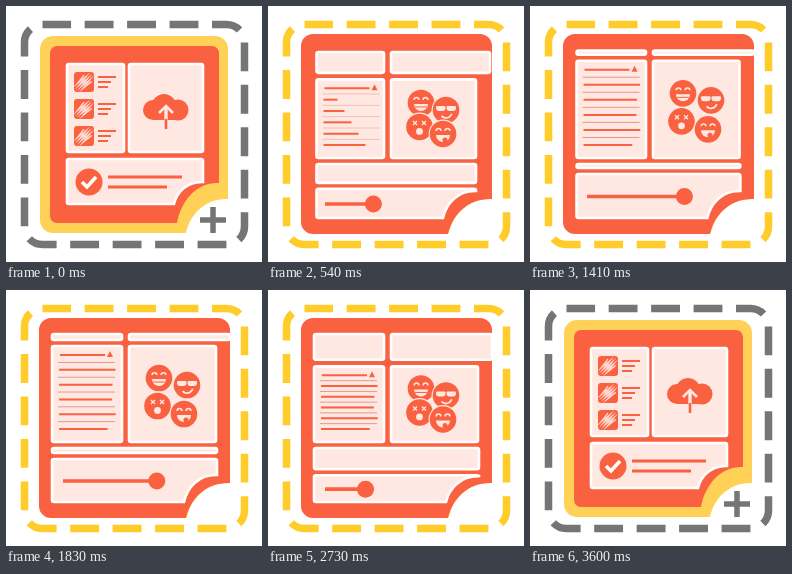
Recreate the animation shown at these times as an HTML page with a canvas. Size 256 px wide and 256 px high, loop 4.74 s.

```html
<!DOCTYPE html>
<html lang="en">
<head>
<meta charset="utf-8">
<title>Layout widget</title>
<style>
html, body { margin: 0; width: 100%; height: 100%; overflow: hidden; background: #fff; }
canvas { display: block; width: 100vw; height: 100vh; }
</style>
</head>
<body>
<canvas id="stage"></canvas>
<script>
const LOOP = 4740;
const ORANGE = '#fa6140', YELLOW = '#ffd257', PALE = '#ffe7e2', GRAY = '#757575';
const canvas = document.getElementById('stage');
const ctx = canvas.getContext('2d');

const clamp = v => Math.max(0, Math.min(1, v));
const lerp = (a, b, k) => a + (b - a) * k;
const ease = v => v * v * (3 - 2 * v);
const ramp = (t, a, b) => ease(clamp((t - a) / (b - a)));
// 0 outside the visit, 1 inside it
const pulse = (t, a, b, c, d) => ramp(t, a, b) * (1 - ramp(t, c, d));

function mix(a, b, k) {
  return `rgb(${a.map((v, i) => Math.round(lerp(v, b[i], k))).join()})`;
}

function box(x0, y0, x1, y1, r, fill, stroke, width) {
  ctx.beginPath();
  ctx.roundRect(x0, y0, x1 - x0, y1 - y0, r);
  if (fill) { ctx.fillStyle = fill; ctx.fill(); }
  if (stroke) { ctx.strokeStyle = stroke; ctx.lineWidth = width; ctx.stroke(); }
}

function line(x0, y0, x1, y1, width, color = ORANGE) {
  ctx.beginPath();
  ctx.moveTo(x0, y0);
  ctx.lineTo(x1, y1);
  ctx.strokeStyle = color;
  ctx.lineWidth = width;
  ctx.stroke();
}

function disc(x, y, r, color) {
  ctx.beginPath();
  ctx.arc(x, y, r, 0, 7);
  ctx.fillStyle = color;
  ctx.fill();
}

function poly(points, color, width) {
  ctx.beginPath();
  points.forEach(([x, y]) => ctx.lineTo(x, y));
  ctx.strokeStyle = color;
  ctx.lineWidth = width;
  ctx.stroke();
}

// Rounded sheet whose bottom right corner is scooped out
function sheet(x0, y0, x1, y1, r, bw, bh, fill, stroke, width) {
  ctx.beginPath();
  ctx.moveTo(x0 + r, y0);
  ctx.arcTo(x1, y0, x1, y1, r);
  ctx.lineTo(x1, y1 - bh);
  ctx.bezierCurveTo(x1 - bw * .55, y1 - bh * 1.02, x1 - bw * .9, y1 - bh * .55, x1 - bw, y1);
  ctx.arcTo(x0, y1, x0, y0, r);
  ctx.arcTo(x0, y0, x1, y0, r);
  ctx.closePath();
  ctx.fillStyle = fill;
  ctx.fill();
  if (stroke) { ctx.strokeStyle = stroke; ctx.lineWidth = width; ctx.stroke(); }
}

function panel(x0, y0, x1, y1) {
  box(x0 + 1, y0 + 1, x1 - 1, y1 - 1, 2, PALE, '#fff', 2.6);
}

function dashes(color) {
  const a = 18.5, b = 238.5, r = 18, step = ((b - a - 2 * r) * 4 + 2 * Math.PI * r) / 20;
  ctx.save();
  ctx.setLineDash([step * .68, step * .32]);
  ctx.lineDashOffset = step * .34 - Math.PI * r / 4;
  ctx.beginPath();
  ctx.moveTo(a + r, a);
  ctx.arcTo(b, a, b, b, r);
  ctx.arcTo(b, b, a, b, r);
  ctx.arcTo(a, b, a, a, r);
  ctx.arcTo(a, a, b, a, r);
  ctx.closePath();
  ctx.strokeStyle = color;
  ctx.lineWidth = 7.5;
  ctx.stroke();
  ctx.restore();
}

function thumb(x, y) {
  box(x - 10, y - 10, x + 10, y + 10, 3, ORANGE);
  const zig = [];
  for (let i = 0; i < 9; i++) {
    const d = i * 1.4 - 5.5, s = i % 2 ? 1 : -1;
    zig.push([x + d * .7 - s * 3.8, y + d * .55 + s * 3.8]);
  }
  poly(zig, '#ffd9d0', 1.4);
}

function cloud(x, y) {
  disc(x - 13, y + 3, 10, ORANGE);
  disc(x - 2, y - 1, 12, ORANGE);
  disc(x + 12, y + 3, 10.5, ORANGE);
  ctx.fillRect(x - 13, y + 3, 26, 10);
  line(x, y + 23, x, y + 2, 3.6, PALE);
  line(x, y + 22, x, y + 1, 2.6);
  poly([[x - 7, y + 6], [x, y - 1], [x + 7, y + 6]], PALE, 2.6);
  line(x, y + 12, x, y, 2.6, PALE);
}

function fileCard(k) {
  panel(60, 57, 119, 147);
  panel(122, 57, 198, 147);
  for (let i = 0; i < 3; i++) {
    const y = lerp(76, 74, k) + i * lerp(27, 25.6, k);
    thumb(78, y);
    line(92, y - 5, 110, y - 5, 2);
    line(92, y, 105, y, 2);
    line(92, y + 5, 102, y + 5, 2);
  }
  cloud(160, 101);
  sheet(61, 153, 197, 198, 2, 29, 22, PALE, '#fff', 2.6);
  disc(83, 176, 13.5, ORANGE);
  poly([[76, 176], [81, 181], [90, 171]], '#fff', 3.6);
  line(102, 171, 176, 171, 3);
  line(102, 181, 161, 181, 3);
}

function smile(x, y) {
  ctx.beginPath();
  ctx.arc(x, y, 7, 0, Math.PI);
  ctx.closePath();
  ctx.fillStyle = PALE;
  ctx.fill();
}

function brow(x, y) {
  ctx.beginPath();
  ctx.arc(x, y, 2.4, Math.PI, 0);
  ctx.strokeStyle = PALE;
  ctx.lineWidth = 1.5;
  ctx.stroke();
}

function cross(x, y) {
  line(x - 2, y - 2, x + 2, y + 2, 1.3, PALE);
  line(x + 2, y - 2, x - 2, y + 2, 1.3, PALE);
}

function faces(y, k) {
  const at = [[153, y], [lerp(178, 181, k), y + 7], [151.5, lerp(y + 24, y + 28, k)], [lerp(175, 178, k), lerp(y + 31, y + 36, k)]];
  at.forEach(([fx, fy], i) => {
    disc(fx, fy, 14.4, PALE);
    disc(fx, fy, 13.3, ORANGE);
    if (i === 0 || i === 3) {
      brow(fx - 4.5, fy - 3);
      brow(fx + 4.5, fy - 3);
      smile(fx, fy + 1);
      if (i === 0) line(fx - 6, fy + 4, fx + 6, fy + 4, 1, ORANGE);
      else disc(fx + 2, fy + 6, 2.5, ORANGE);
    } else if (i === 1) {
      box(fx - 10, fy - 4, fx - .5, fy + 1, [1, 1, 3, 3], PALE);
      box(fx + .5, fy - 4, fx + 10, fy + 1, [1, 1, 3, 3], PALE);
      ctx.beginPath();
      ctx.arc(fx, fy + 2, 6, .3, 2.4);
      ctx.strokeStyle = PALE;
      ctx.lineWidth = 1.8;
      ctx.stroke();
    } else {
      cross(fx - 4.5, fy - 4);
      cross(fx + 4.5, fy - 4);
      disc(fx, fy + 4.5, 3.4, PALE);
    }
  });
}

function list(x, top, full) {
  const head = top + 10;
  line(x + 9, head, x + 54, head, 2);
  ctx.beginPath();
  ctx.moveTo(x + 56, head + 2);
  ctx.lineTo(x + 59, head - 4);
  ctx.lineTo(x + 62, head + 2);
  ctx.fillStyle = ORANGE;
  ctx.fill();
  const gap = (139 - head) / 5;
  for (let i = 1; i < 6; i++) {
    const y = head + gap * i;
    const wide = 48 + 9 * Math.abs(Math.sin(i * 1.9));
    line(x + 7, y - gap / 2, x + 64, y - gap / 2, 1, `rgba(220,120,105,${lerp(.35, .7, full)})`);
    line(x + 8, y, x + 8 + lerp(7 + i * 7, wide, full), y, 2);
  }
}

function slideCard(t) {
  const knob = 123 + 33 * Math.cos((t - 1560) / 3000 * 2 * Math.PI);
  const k = (knob - 105) / 46;
  const grow = ramp(t, 500, 1800);
  const left = lerp(47.5, 45, grow), right = lerp(209, 212, grow), far = lerp(223, 225, grow);
  const head = lerp(45, 43, grow), barEnd = lerp(68, 51, k);
  const top = lerp(72.5, 55, k), strip = lerp(178, 164, k), foot = lerp(183, 169, k);
  panel(left, head, 117, barEnd);
  panel(122, head, far, barEnd);
  panel(left, top, 117, 153);
  panel(122, top, lerp(209, 211, grow), 153);
  list(left, top, ramp(t, 540, 960));
  faces(lerp(97, 88, k), clamp(k));
  panel(left, 157, right, strip);
  const h = 212 - foot;
  sheet(left + 1, foot, right - 1, 212, 2, 33, Math.min(27, h - 1), PALE, '#fff', 2.6);
  const y = lerp(198, 191, k);
  line(57, y, knob, y, 3.6);
  disc(knob, y, 8.5, ORANGE);
}

function plus(size) {
  if (size <= 0) return;
  const v = 13 * clamp(size * 1.4), h = 13 * clamp(size * 1.8 - .8);
  line(207, 214 - v, 207, 214 + v, 5.5, GRAY);
  if (h > 0) line(207 - h, 214, 207 + h, 214, 5.5, GRAY);
}

function draw(t) {
  const tint = pulse(t, 30, 360, 2970, 3330);
  const slim = pulse(t, 30, 330, 2910, 3360);
  const swap = pulse(t, 270, 390, 2820, 2940);
  ctx.fillStyle = '#fff';
  ctx.fillRect(0, 0, 256, 256);
  dashes(mix([117, 117, 117], [255, 204, 42], tint));

  sheet(34, lerp(30, 29, slim), lerp(222, 223, slim), 227, 13, 42, 34, YELLOW);
  const pad = lerp(10, 0, slim);
  const grow = swap;
  sheet(34 + pad - grow, 30 + pad - 2 * grow, 223 - pad + grow, 227 - pad + grow, lerp(7, 12, slim),
    lerp(42, 44, slim), lerp(40, 35, slim), ORANGE);

  if (swap < 1) {
    ctx.globalAlpha = 1 - swap;
    fileCard(slim);
  }
  if (swap > 0) {
    ctx.globalAlpha = swap;
    slideCard(t);
  }
  ctx.globalAlpha = 1;
  plus(1 - pulse(t, 30, 240, 3000, 3330));
}

function fit() {
  const d = window.devicePixelRatio || 1;
  canvas.width = Math.round(innerWidth * d);
  canvas.height = Math.round(innerHeight * d);
}

const start = performance.now();
function tick() {
  ctx.setTransform(canvas.width / 256, 0, 0, canvas.height / 256, 0, 0);
  draw((performance.now() - start) % LOOP);
  requestAnimationFrame(tick);
}

addEventListener('resize', fit);
fit();
tick();
</script>
</body>
</html>
```
